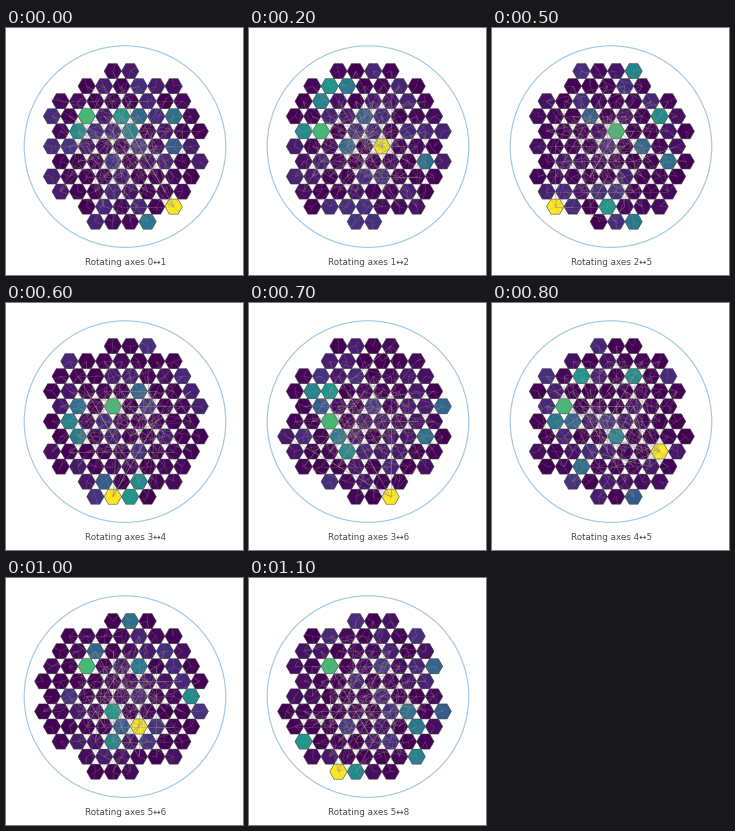
These frames come from a looping animation (237x247 px, 1200 ms). A matplotlib script:

```python
import matplotlib.pyplot as plt
import numpy as np
from matplotlib.animation import FuncAnimation
from matplotlib.collections import LineCollection, PolyCollection

W, H, DPI = 237, 247, 72
STEPS = 12
CENTER = np.array([115.5, 118.4])
R = 8.69                            # cell radius
ROW = R * np.sqrt(3)

# Key positions of the two strongest cells; other steps lie between them
KEYS = [0, 2, 4, 5, 7, 9, 11]
PEAK = [(168, 179), (133, 118), (194, 103), (63, 179), (142, 194), (185, 88), (89, 194)]
SECOND = [(81, 88), (72, 103), (81, 88), (124, 103), (81, 118), (72, 103), (81, 88)]


def axes_pair(n):
    i = n // 2
    return i, i + (3 if n % 2 else 1)


def lattice():
    """Centres of a flat-topped hexagonal field around CENTER."""
    return CENTER + np.array([(m * R, r * ROW) for r in range(-5, 6)
                              for m in range(-10, 11) if (m + r) % 2 == 0])


def along(track, n):
    xs, ys = np.transpose(track)
    return np.array([np.interp(n, KEYS, xs), np.interp(n, KEYS, ys)])


def nearest(pts, p):
    return np.argmin(np.hypot(*(pts - p).T))


def layout(n):
    """Cell centres, cell values and link segments of one step."""
    rng = np.random.default_rng(60 + n)
    pts = lattice()
    dist = np.hypot(*(pts - CENTER - (1.5, 0)).T)
    keep = rng.random(len(pts)) < (82 - dist) / 4     # ragged rim
    peak = along(PEAK, n)
    keep[nearest(pts, peak)] = True
    pts, dist = pts[keep], dist[keep]
    size = len(pts)

    vals = .15 * rng.random(size) ** 3.5
    warm = rng.choice(size, 7, replace=False)
    vals[warm] = np.linspace(.52, .28, 7)
    top = nearest(pts, peak)
    vals[nearest(pts, along(SECOND, n))] = .69
    vals[top] = 1

    # Links gather near the middle; every cell also holds short stubs
    near = np.exp(-(dist / 65) ** 2)
    near /= near.sum()
    a, b = rng.choice(size, (2, 120), p=near)
    hub = rng.choice(size, 10, p=near)
    links = [(pts[i], pts[j]) for i, j in zip(a, b)]
    links += [(pts[top], pts[j]) for j in hub]
    for p in pts:
        t = rng.uniform(0, 2 * np.pi, 2)
        tips = p + rng.uniform(4, 10, (2, 1)) * np.c_[np.cos(t), np.sin(t)]
        links += [(p, tip) for tip in tips]
    return pts, vals, links


fig = plt.figure(figsize=(W / DPI, H / DPI), dpi=DPI, facecolor="white")
ax = fig.add_axes([0, 0, 1, 1])
ax.set(xlim=(0, W), ylim=(H, 0))
ax.axis("off")

ax.add_patch(plt.Circle((119, 118.6), 100.8, fill=False, ec="#a0c7e2", lw=1.15))
angles = np.arange(6) * np.pi / 3
hexagon = R * np.c_[np.cos(angles), np.sin(angles)]
tiles = PolyCollection([], cmap="viridis", edgecolors="#3a3a3a", linewidths=.5)
tiles.set_clim(0, 1)
threads = LineCollection([], colors="#98948c", linewidths=.55, alpha=.4, zorder=3)
ax.add_collection(tiles, autolim=False)
ax.add_collection(threads, autolim=False)
label = ax.text(119.2, 237.3, "", ha="center", va="baseline", fontsize=8.8,
                family="DejaVu Sans", color="#4a4a55")

scenes = [layout(n) for n in range(STEPS)]


def draw(n):
    pts, vals, links = scenes[n]
    tiles.set_verts([p + hexagon for p in pts])
    tiles.set_array(vals)
    threads.set_segments(links)
    label.set_text("Rotating axes {}↔{}".format(*axes_pair(n)))
    return tiles, threads, label


anim = FuncAnimation(fig, draw, frames=STEPS, interval=100, repeat=True, repeat_delay=0)
plt.show()
```
